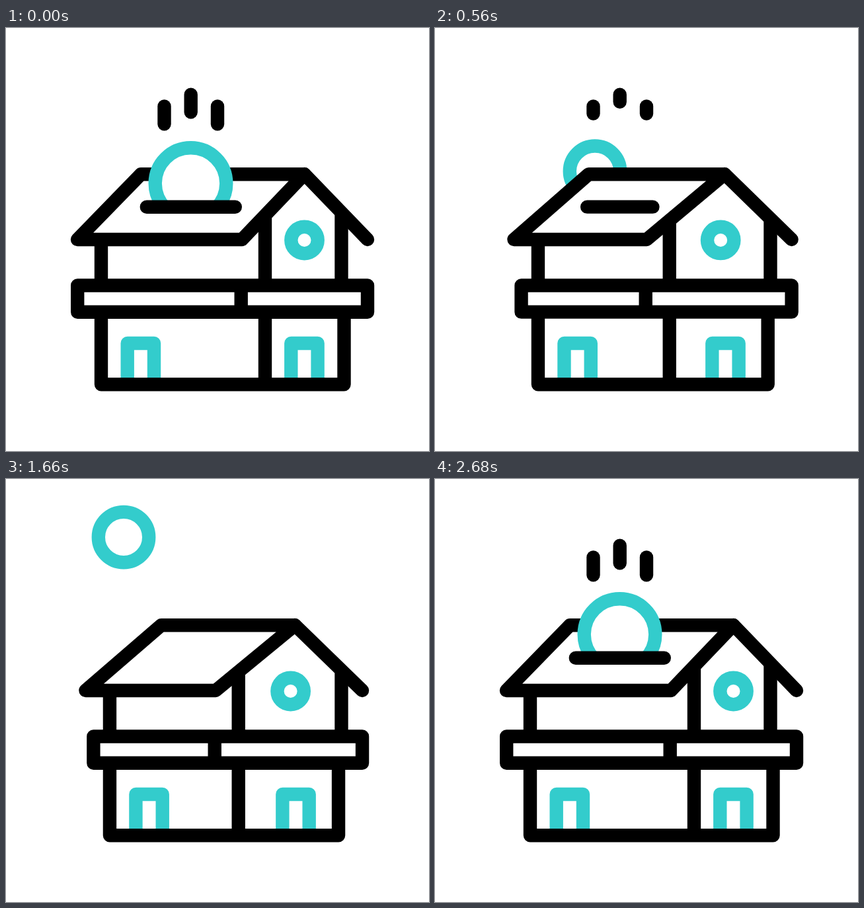
Write an HTML page with a canvas that moves like this. It is 640x640 px and loops after 3560 ms.

```html
<!DOCTYPE html>
<html lang="en">
<head>
<meta charset="utf-8">
<title>House and coins</title>
<style>
  html, body { margin: 0; width: 100%; height: 100%; overflow: hidden; background: #fff; }
  canvas { display: block; width: 640px; height: 640px; }
</style>
</head>
<body>
<canvas id="stage" width="640" height="640"></canvas>
<script>
const ctx = document.getElementById('stage').getContext('2d');
const LOOP = 3560, STEP = 20;
const BLACK = '#000', CYAN = '#33cccc', WHITE = '#fff';

// x positions of the house parts: [wide, narrow]
const PARTS = {
  eaveLeft: [108, 120.5], ridgeLeft: [204, 235], apex: [451.5, 437],
  eaveRight: [547, 539], eaveFront: [357, 317],
  wallLeft: [144, 157], wallMid: [392, 351.5], wallRight: [511.5, 503],
  railLeft: [108.2, 132.5], railMid: [355.7, 315.5], railRight: [547, 539],
  doorA: [183.7, 196.5], doorB: [431.3, 418.3], window: [451.5, 430.5]
};
const GABLE_RIGHT = 507.5;

// [time, vertical shift of the house]
const HOP = [[120, 0], [390, -25.5], [690, 17], [1060, 0]];

// burst rays: inner x, inner y, outer x, outer y
const RAYS = [[266.7, 259, 246, 229.6], [282, 257, 282, 221.5], [297.5, 258.5, 318, 228.6]];
// motion bars: x, top, bottom
const BARS = [[239.5, 118.5, 145.2], [279.7, 100.7, 127.3], [320, 118.5, 145.2]];

const clamp = u => Math.min(1, Math.max(0, u));
const mix = (a, b, u) => a + (b - a) * u;
const ramp = (t, a, b) => clamp((t - a) / (b - a));
const smooth = u => u * u * (3 - 2 * u);
const ease = (t, a, b) => smooth(ramp(t, a, b));

function hopAt(t) {
  let y = 0;
  for (let i = 1; i < HOP.length; i++) {
    const [t0, y0] = HOP[i - 1], [t1, y1] = HOP[i];
    if (t >= t0) y = mix(y0, y1, ease(t, t0, t1));
  }
  return y;
}

function path(points, closed) {
  ctx.beginPath();
  points.forEach(([x, y]) => ctx.lineTo(x, y));
  if (closed) ctx.closePath();
}

function line(points, color = BLACK, cap = 'round') {
  path(points);
  ctx.lineCap = cap;
  ctx.strokeStyle = color;
  ctx.stroke();
}

function shape(points, outlined = true) {
  path(points, true);
  ctx.fillStyle = WHITE;
  ctx.fill();
  if (outlined) {
    ctx.strokeStyle = BLACK;
    ctx.stroke();
  }
}

function ring(x, y, r) {
  ctx.beginPath();
  ctx.arc(x, y, r, 0, Math.PI * 2);
  ctx.fillStyle = WHITE;
  ctx.fill();
  ctx.strokeStyle = CYAN;
  ctx.stroke();
}

const box = (x0, y0, x1, y1) => [[x0, y0], [x1, y0], [x1, y1], [x0, y1]];

function door(x) {
  line([[x, 535], [x, 477], [x + 40.3, 477], [x + 40.3, 535]], CYAN, 'butt');
}

function house(narrow) {
  const h = {};
  for (const key in PARTS) h[key] = mix(...PARTS[key], narrow);
  const apex = [h.apex, 221];
  const slopeY = (x, end) => mix(221, 320, (x - h.apex) / (end - h.apex));
  const rightY = slopeY(GABLE_RIGHT, h.eaveRight) + 4;
  const midY = slopeY(h.wallMid, h.eaveFront) + 4;

  shape([[h.wallLeft, 310], apex, [GABLE_RIGHT, rightY], [GABLE_RIGHT, 400],
         [h.wallRight, 430], [h.wallRight, 539], [h.wallLeft, 539]], false);
  door(h.doorA);
  door(h.doorB);
  ring(h.window, 321, 20.2);

  line([[h.wallLeft, 320], [h.wallLeft, 389]], BLACK, 'butt');
  line([[GABLE_RIGHT, rightY], [GABLE_RIGHT, 389]], BLACK, 'butt');
  line([[h.wallLeft, 430], [h.wallLeft, 539.3], [h.wallRight, 539.3], [h.wallRight, 430]]);
  line([[h.wallMid, midY], [h.wallMid, 539]], BLACK, 'butt');

  shape(box(h.railLeft, 389.5, h.railRight, 429.7));
  line([[h.railMid, 389.5], [h.railMid, 429.7]], BLACK, 'butt');

  shape([[h.eaveLeft, 320], [h.ridgeLeft, 221.3], [h.apex, 221.3], [h.eaveFront, 320]]);
  line([apex, [h.eaveRight, 320]]);
}

function smallCoin(t, hop) {
  const away = t < 1370 ? 1120 - t : t - 1620;
  const drop = 214 * ease(away, 0, 980);
  ring(178 + 0.0038 * drop * drop, 87 + drop + hop * 0.53, 38.2);
}

function bigCoin(t) {
  const y = t < 1400
    ? 235 + 40 * (Math.max(0, t - 120) / 280) ** 2
    : 235 - 229 * (Math.max(0, 2680 - t) / 440) ** 2;
  if (y > 340 || y < -70) return;
  ctx.save();
  ctx.beginPath();
  ctx.rect(0, -100, 640, 370.5);
  ctx.clip();
  ring(279.5, y, 53.8);
  ctx.restore();
}

function slot(t) {
  const size = t < 1400 ? 1 - ease(t, 520, 640) : ease(t, 2380, 2580);
  if (size > 0) line([[279.8 - 67 * size, 270.7], [279.8 + 67 * size, 270.7]]);
}

function bars(t) {
  const size = t < 1400 ? 1 - ease(t, 460, 640) : ease(t, 2460, 2680);
  if (size <= 0) return;
  BARS.forEach(([x, top, bottom]) => line([[x, top], [x, mix(top, bottom, size)]]));
}

function burst(t) {
  const head = ease(t, 640, 740), tail = ramp(t, 650, 830);
  if (head <= tail) return;
  RAYS.forEach(([x0, y0, x1, y1]) => {
    const at = u => [mix(x0, x1, u), mix(y0, y1, u)];
    line([at(tail), at(head)], CYAN);
  });
}

function draw(t) {
  const hop = hopAt(t);
  const narrow = ease(t, 180, 640) - ease(t, 1640, 2100);
  ctx.fillStyle = WHITE;
  ctx.fillRect(0, 0, 640, 640);
  ctx.lineWidth = 20.4;
  ctx.lineJoin = 'round';
  smallCoin(t, hop);
  ctx.save();
  ctx.translate(0, hop);
  house(narrow);
  bigCoin(t);
  slot(t);
  bars(t);
  burst(t);
  ctx.restore();
}

const start = performance.now();
function tick() {
  const t = (performance.now() - start) % LOOP;
  draw(Math.floor(t / STEP) * STEP);
  requestAnimationFrame(tick);
}
tick();
</script>
</body>
</html>
```
